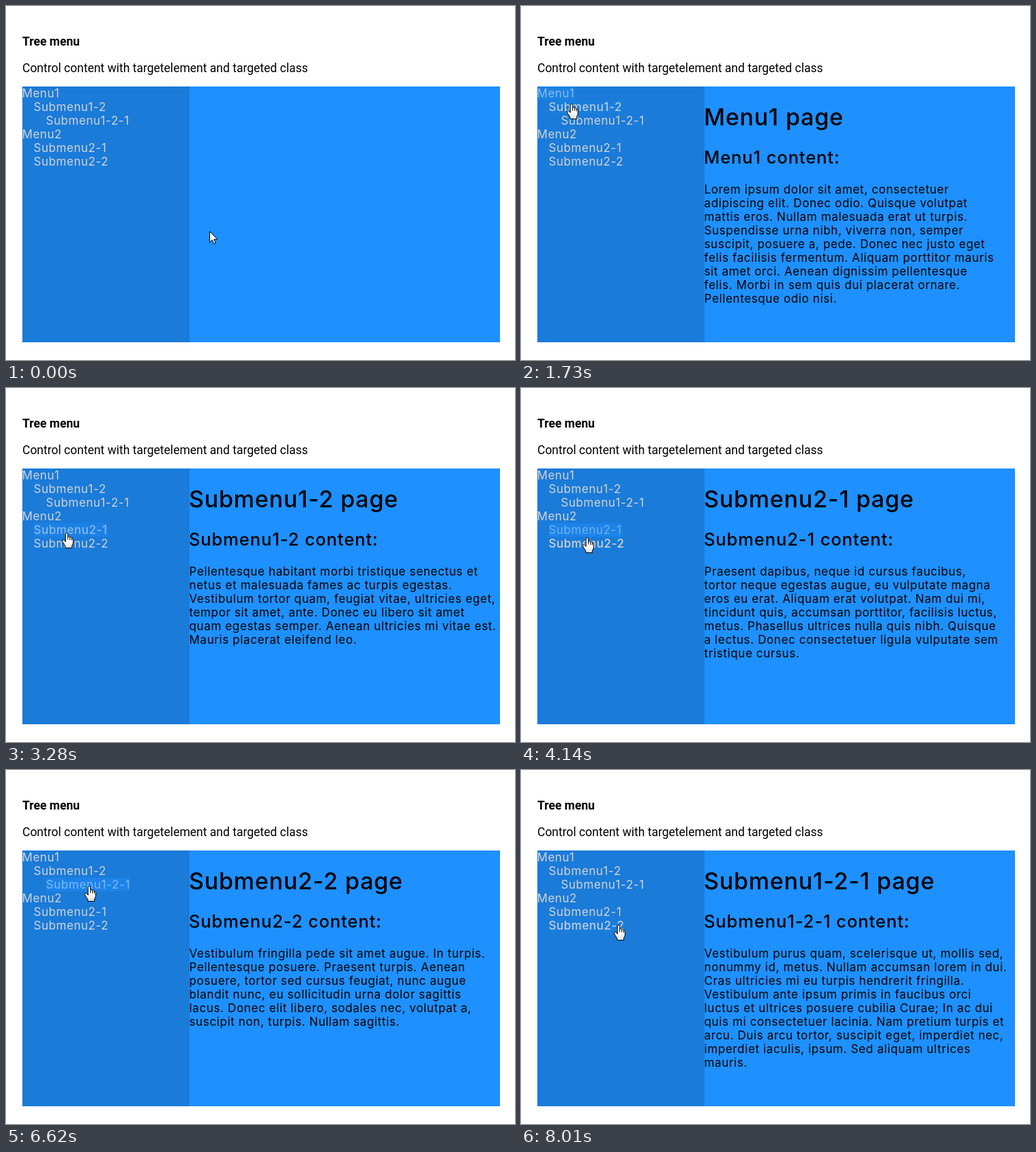
Write an HTML page that moves like this. It is 746 px wide and 519 px high and loops after 8100 ms.

```html
<!DOCTYPE html>
<html lang="en">
<head>
<meta charset="utf-8">
<title>Tree menu</title>
<style>
  html, body { margin: 0; width: 100%; height: 100%; overflow: hidden; background: #fff; }
  svg { display: block; }
  text { font-family: Inter, "Open Sans", sans-serif; white-space: pre; }
  .intro { font: 17.5px Roboto, sans-serif; }
  .menu text { font-size: 17px; letter-spacing: .55px; }
  .h1 { font-size: 34px; font-weight: 500; letter-spacing: .8px; }
  .h2 { font-size: 25.5px; font-weight: 500; letter-spacing: .9px; }
  .body { font-size: 17px; letter-spacing: .63px; }
</style>
</head>
<body>
<svg id="stage" width="746" height="519" viewBox="0 0 746 519">
  <defs>
    <linearGradient id="skin" x2="0" y2="1">
      <stop offset=".5" stop-color="#fff"/><stop offset="1" stop-color="#dcdcdc"/>
    </linearGradient>
  </defs>
  <text class="intro" x="24" y="58" style="font-weight:700">Tree menu</text>
  <text class="intro" x="24" y="97">Control content with targetelement and targeted class</text>
  <rect x="24" y="118" width="700" height="375" fill="#1e90ff"/>
  <rect x="24" y="118" width="245" height="375" fill="#1a7bd9"/>
  <g class="menu" id="menu"></g>
  <g id="page"></g>
  <path id="arrow" fill="#fff" stroke="#000" d="M.5.5V16.5L4.3 12.9 6.8 18.5 9.2 17.5 6.8 12H11.8Z"/>
  <g id="hand" stroke="#000" stroke-linejoin="round">
    <path fill="url(#skin)" d="M-1.7 1.5Q0-.6 1.7 1.5V6Q3.6 5 4.7 6.8 6.5 6 7.4 7.9 9.5 7.4 9.5 9.8V14Q9.5 17 7.7 19V22.5H-2V20Q-4 17.5-6.3 12.8-7 10.4-4.8 10.5-3.2 11-1.7 13.4Z"/>
    <path fill="none" d="M1.7 6V10.5M4.7 7V11M7.4 8V11.5"/>
  </g>
</svg>
<script>
const LOOP = 8100, FADE = 300;
const $ = id => document.getElementById(id);
const mix = (a, b, k) => a + (b - a) * k;

// name, left, right of each menu row
const items = [
  ["Menu1", 24, 78], ["Submenu1-2", 41, 149], ["Submenu1-2-1", 59, 181],
  ["Menu2", 24, 80], ["Submenu2-1", 41, 149], ["Submenu2-2", 41, 151]
];

// time of the click, menu row, text
const pages = [
  [1260, 0, `Lorem ipsum dolor sit amet, consectetuer
adipiscing elit. Donec odio. Quisque volutpat
mattis eros. Nullam malesuada erat ut turpis.
Suspendisse urna nibh, viverra non, semper
suscipit, posuere a, pede. Donec nec justo eget
felis facilisis fermentum. Aliquam porttitor mauris
sit amet orci. Aenean dignissim pellentesque
felis. Morbi in sem quis dui placerat ornare.
Pellentesque odio nisi.`],
  [2360, 1, `Pellentesque habitant morbi tristique senectus et
netus et malesuada fames ac turpis egestas.
Vestibulum tortor quam, feugiat vitae, ultricies eget,
tempor sit amet, ante. Donec eu libero sit amet
quam egestas semper. Aenean ultricies mi vitae est.
Mauris placerat eleifend leo.`],
  [3450, 4, `Praesent dapibus, neque id cursus faucibus,
tortor neque egestas augue, eu vulputate magna
eros eu erat. Aliquam erat volutpat. Nam dui mi,
tincidunt quis, accumsan porttitor, facilisis luctus,
metus. Phasellus ultrices nulla quis nibh. Quisque
a lectus. Donec consectetuer ligula vulputate sem
tristique cursus.`],
  [5230, 5, `Vestibulum fringilla pede sit amet augue. In turpis.
Pellentesque posuere. Praesent turpis. Aenean
posuere, tortor sed cursus feugiat, nunc augue
blandit nunc, eu sollicitudin urna dolor sagittis
lacus. Donec elit libero, sodales nec, volutpat a,
suscipit non, turpis. Nullam sagittis.`],
  [7550, 2, `Vestibulum purus quam, scelerisque ut, mollis sed,
nonummy id, metus. Nullam accumsan lorem in dui.
Cras ultricies mi eu turpis hendrerit fringilla.
Vestibulum ante ipsum primis in faucibus orci
luctus et ultrices posuere cubilia Curae; In ac dui
quis mi consectetuer lacinia. Nam pretium turpis et
arcu. Duis arcu tortor, suscipit eget, imperdiet nec,
imperdiet iaculis, ipsum. Sed aliquam ultrices
mauris.`]
];

// first step, last step, number of steps, pointer target
const moves = [
  [70, 880, 11, 68, 139], [940, 1090, 3, 62, 130], [1260, 1340, 2, 62, 130],
  [1560, 1970, 6, 80, 150], [2360, 2360, 1, 80, 150], [2680, 3280, 9, 89, 212],
  [3450, 3530, 2, 89, 212], [3990, 4370, 6, 107, 227], [5230, 5230, 1, 107, 227],
  [5760, 6300, 8, 122, 170], [6620, 6620, 1, 122, 170], [7550, 7550, 1, 122, 170],
  [7690, 7770, 2, 133, 197], [7910, 8010, 3, 143, 227]
];

function add(parent, tag, attrs, content = "") {
  const el = document.createElementNS("http://www.w3.org/2000/svg", tag);
  for (const key in attrs) el.setAttribute(key, attrs[key]);
  el.textContent = content;
  return parent.appendChild(el);
}

const rows = items.map(([name, left, right], i) => ({
  box: add($("menu"), "rect", { x: left, y: 118 + 20 * i, width: right - left, height: 20, fill: "#1e90ff" }),
  label: add($("menu"), "text", { x: left - .5, y: 134 + 20 * i }, name)
}));

const pageGroups = pages.map(([, row, body]) => {
  const group = add($("page"), "g", {}), name = items[row][0];
  add(group, "text", { class: "h1", x: 268, y: 175 }, name + " page");
  add(group, "text", { class: "h2", x: 268, y: 231 }, name + " content:");
  body.split("\n").forEach((line, i) =>
    add(group, "text", { class: "body", x: 268.5, y: 275 + 20 * i }, line));
  return group;
});

function rowAt(x, y) {
  const row = Math.floor((y - 118) / 20), item = items[row];
  return item && x >= item[1] && x < item[2] ? row : -1;
}

// Pointer positions and hover fades at every step of the loop
const states = [{ time: 0, x: 298, y: 330, hover: -1, levels: items.map(() => 0) }];
for (const [start, end, steps, toX, toY] of moves) {
  const from = states.at(-1);
  for (let k = 0; k < steps; k++) {
    const last = states.at(-1);
    const time = steps > 1 ? mix(start, end, k / (steps - 1)) : start;
    const ease = 1 - (1 - (k + 1) / steps) ** 1.5;
    const x = mix(from.x, toX, ease), y = mix(from.y, toY, ease);
    const change = (time - last.time) / FADE;
    const levels = last.levels.map((v, i) =>
      i === last.hover ? Math.min(1, v + change) : Math.max(0, v - change));
    states.push({ time, x, y, hover: rowAt(x, y), levels });
  }
}

function draw(now) {
  const t = now % LOOP;
  const state = states.findLast(s => s.time <= t + .01);
  const open = pages.findLastIndex(p => p[0] <= t + .01);
  rows.forEach(({ box, label }, i) => {
    const k = state.levels[i];
    box.style.opacity = .4 * k;
    label.style.fill = `rgb(${mix(211, 112, k)},${mix(211, 178, k)},${mix(211, 242, k)})`;
    label.style.fontWeight = i === state.hover ? 500 : 400;
  });
  pageGroups.forEach((g, i) => g.style.display = i === open ? "" : "none");
  const pointing = state.hover >= 0;
  $("hand").style.display = pointing ? "" : "none";
  $("arrow").style.display = pointing ? "none" : "";
  $(pointing ? "hand" : "arrow").setAttribute("transform",
    `translate(${Math.round(state.x)} ${Math.round(state.y)})`);
}

let begin;
function tick(now) {
  begin ??= now;
  draw(now - begin);
  requestAnimationFrame(tick);
}
draw(0);
requestAnimationFrame(tick);
</script>
</body>
</html>
```
